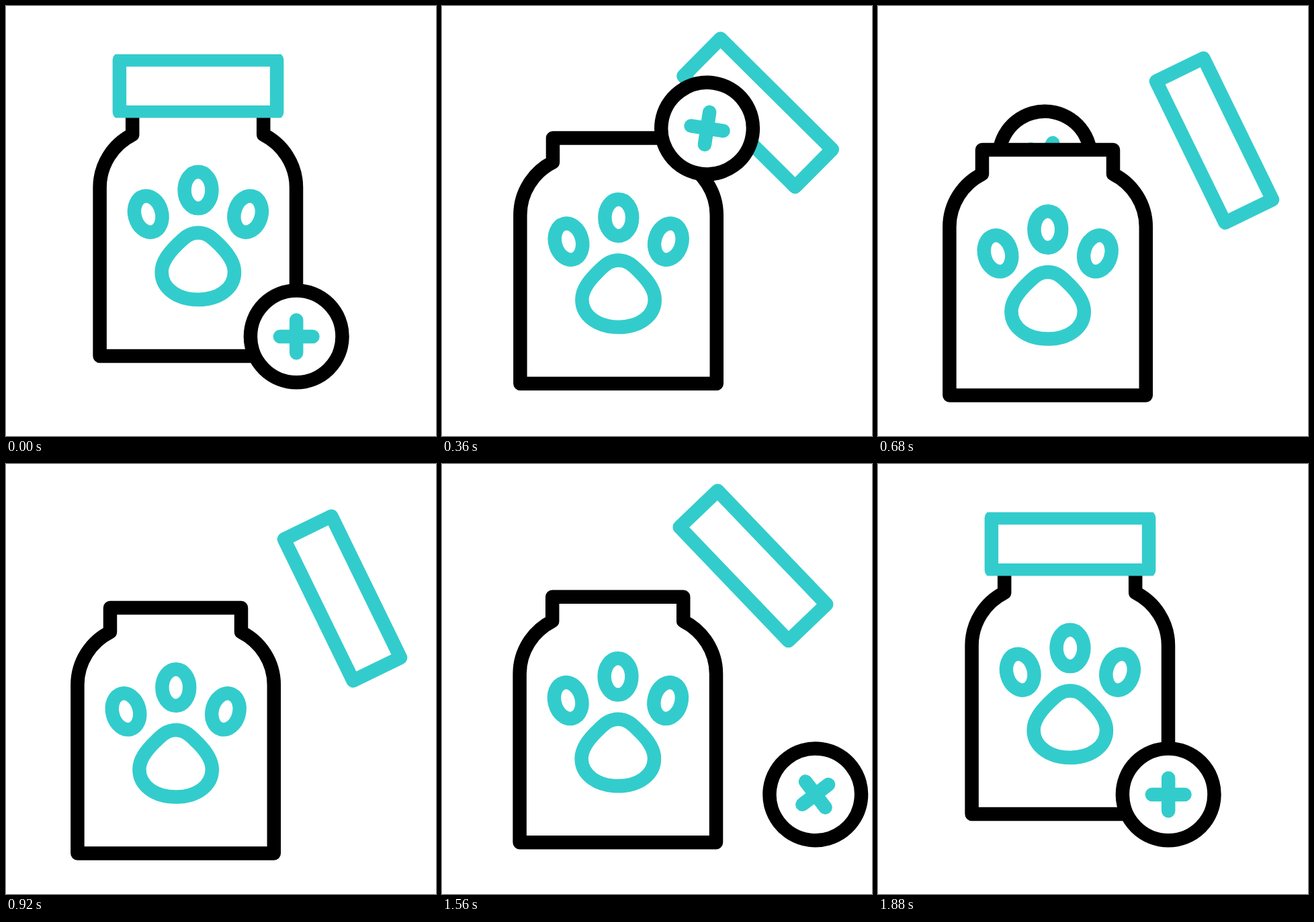
An HTML page for the animation above (2000 ms loop, 640x640 px).

```html
<!DOCTYPE html>
<html lang="en">
<head>
<meta charset="utf-8">
<title>Pet medicine jar</title>
<style>
  html, body { margin: 0; width: 100%; height: 100%; overflow: hidden; background: #fff; }
  svg { display: block; width: 100%; height: 100%; }
  #stage { fill: #fff; stroke: #000; stroke-width: 20.5; stroke-linecap: round; stroke-linejoin: round; }
  .teal { stroke: #33cccc; }
</style>
</head>
<body>
<svg viewBox="0 0 640 640">
  <defs>
    <clipPath id="closed"><rect x="-140" y="-47.3" width="280" height="94.7"/></clipPath>
    <path id="rise" d="M432.2 491.9C416 375 433 88 302 101"/>
    <path id="fall" d="M302 101C254 160 212 260 225 776"/>
  </defs>
  <g id="stage">
    <g id="jar">
      <path d="M188.2 155.4H383.2V191.5C412 206 432 236 432 270V520.9H139.6V270C139.6 236 159.5 206 188.2 191.5Z"/>
      <g class="teal">
        <ellipse cx="286" cy="274" rx="20.4" ry="27.2"/>
        <ellipse rx="20.2" ry="27.4" transform="translate(211.7 309.7) rotate(-15)"/>
        <ellipse rx="20.2" ry="27.4" transform="translate(360.1 309.7) rotate(15)"/>
        <path d="M286 337.4C300 337.4 308 346 318 356C330 368 340 381 340 396C340 421 316 437 286 437C256 437 231.6 421 231.6 396C231.6 381 242 368 254 356C264 346 272 337.4 286 337.4Z"/>
      </g>
    </g>
    <g id="lid" class="teal">
      <rect x="-117.1" y="-39.2" width="234.2" height="78.4"/>
    </g>
    <g id="ball">
      <circle r="68.3"/>
      <path class="teal" d="M-24.3 0H24.3M0 -24.3V24.3"/>
    </g>
  </g>
</svg>
<script>
const LOOP = 2000, STEP = 40;
const [stage, jar, lid, ball, rise, fall] =
  ['stage', 'jar', 'lid', 'ball', 'rise', 'fall'].map(id => document.getElementById(id));

const cubic = (t, a, b, c, d) => {
  const k = 1 - t;
  return k * k * k * a + 3 * k * k * t * b + 3 * k * t * t * c + t * t * t * d;
};

// Eased progress from one time to another; grip is the length of the ease at both ends.
function ease(now, from, to, grip = 1 / 3) {
  const u = Math.min(1, Math.max(0, (now - from) / (to - from)));
  if (u === 0 || u === 1) return u;
  let lo = 0, hi = 1;
  for (let i = 0; i < 30; i++) {
    const mid = (lo + hi) / 2;
    if (cubic(mid, 0, grip, 1 - grip, 1) < u) lo = mid; else hi = mid;
  }
  return cubic(lo, 0, 0, 1, 1);
}

const place = (el, x, y, angle = 0) =>
  el.setAttribute('transform', `translate(${x} ${y}) rotate(${angle})`);

const along = (path, p) => path.getPointAtLength(path.getTotalLength() * p);

// Lid paths as offsets of two control points and the end point.
const LID_OUT = { x: [37, 235, 214.5], y: [-4, 29, 81] };
const LID_BACK = { x: [55, 200, 214.5], y: [-44, 21, 81] };

function ballPoint(now) {
  if (now < 520) return along(rise, ease(now, 80, 520));
  if (now < 1080) return along(fall, ease(now, 520, 1080));
  return { x: 757 - 324.8 * ease(now, 1080, 1880, 1 / 6), y: 491.9 };
}

function draw(now) {
  const back = now >= 1240;
  const open = back ? 1 - ease(now, 1390, 1880) : ease(now, 80, 520);
  place(jar, -33.2 * open, 58.6 * open);

  const way = back ? LID_BACK : LID_OUT;
  place(lid, 286 + cubic(open, 0, ...way.x), 119.1 + cubic(open, 0, ...way.y), 64 * open);
  if (open) lid.removeAttribute('clip-path');
  else lid.setAttribute('clip-path', 'url(#closed)');

  const { x, y } = ballPoint(now);
  const turn = now < 1080 ? 45 * ease(now, 80, 1080) : 45 - 405 * ease(now, 1080, 1880);
  place(ball, x, y, turn);
  ball.style.display = now >= 760 && now < 1080 ? 'none' : '';

  // The ball drops into the jar behind its front.
  const next = now >= 520 && now < 1080 ? jar : null;
  if (ball.nextElementSibling !== next) stage.insertBefore(ball, next);
}

const start = performance.now();
function tick() {
  const now = (performance.now() - start) % LOOP;
  draw(Math.floor(now / STEP) * STEP);
  requestAnimationFrame(tick);
}
tick();
</script>
</body>
</html>
```
